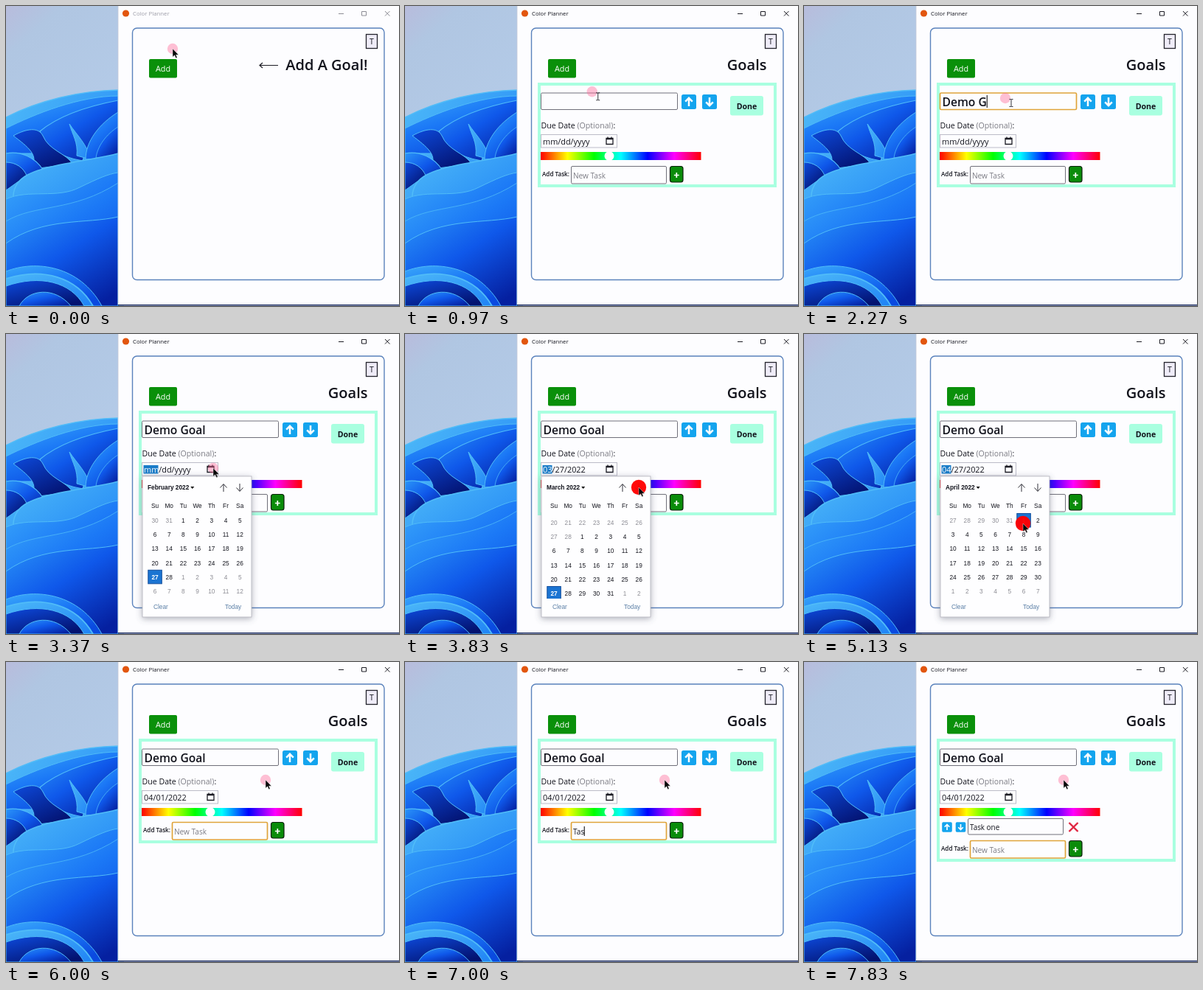
An HTML page for the animation above (8 s loop, 533 by 407 pixels).

```html
<!DOCTYPE html>
<html lang="en">
<head>
<meta charset="utf-8">
<title>Color Planner</title>
<style>
html, body { margin: 0; width: 100%; height: 100%; overflow: hidden; background: #fdfdff; }
svg { display: block; width: 533px; height: 407px; }
text { font-family: "Open Sans", "Noto Sans", sans-serif; fill: #12131c; white-space: pre; }
.medium { font-weight: 500; }
.semi { font-weight: 600; }
.bold { font-weight: 700; }
.mid { text-anchor: middle; }
.hint { fill: #7c7c84; }
.cal text { font-family: "Liberation Sans", Arial, sans-serif; font-size: 8.3px; }
.cal .foot { fill: #5b7fa6; }
.line { fill: none; stroke: #1c1c24; }
.field { fill: #fdfdff; stroke: #70707a; }
.field.focus { stroke: #dfa43a; stroke-width: 1.7; }
</style>
</head>
<body>
<svg viewBox="0 0 533 407">
  <defs>
    <linearGradient id="sky" x2=".35" y2="1">
      <stop stop-color="#b8bcdc"/><stop offset=".15" stop-color="#b0c6e2"/>
      <stop offset=".6" stop-color="#b4cbe8"/><stop offset="1" stop-color="#cfdff2"/>
    </linearGradient>
    <linearGradient id="pale" x2="1" y2="1"><stop stop-color="#4cb8f8"/><stop offset="1" stop-color="#1f82f6"/></linearGradient>
    <linearGradient id="blue" x2=".6" y2="1"><stop stop-color="#3aa8fa"/><stop offset=".5" stop-color="#1b78f6"/><stop offset="1" stop-color="#0a4ae0"/></linearGradient>
    <linearGradient id="deep" x2=".8" y2="1"><stop stop-color="#2a94f8"/><stop offset=".5" stop-color="#0f58ea"/><stop offset="1" stop-color="#0520a0"/></linearGradient>
    <linearGradient id="navy" x2=".7" y2="1"><stop stop-color="#0d4adc"/><stop offset="1" stop-color="#031270"/></linearGradient>
    <linearGradient id="hues">
      <stop stop-color="#f00"/><stop offset=".167" stop-color="#ff0"/><stop offset=".333" stop-color="#0f0"/>
      <stop offset=".5" stop-color="#0ff"/><stop offset=".667" stop-color="#00f"/>
      <stop offset=".833" stop-color="#f0f"/><stop offset="1" stop-color="#f00"/>
    </linearGradient>
    <filter id="shade" x="-20%" y="-20%" width="140%" height="140%"><feDropShadow dx="0" dy="2" stdDeviation="4" flood-color="#505468" flood-opacity=".45"/></filter>
    <clipPath id="grid"><rect x="186" y="241" width="146" height="118"/></clipPath>
    <g id="up">
      <rect x="-10" y="-10" width="20" height="20" rx="2.500" fill="#14a4ee"/>
      <path d="M0 6V-4.500M-4.800-.4L0-5.200L4.800-.4" fill="none" stroke="#fff" stroke-width="2.500"/>
    </g>
  </defs>

  <rect width="160" height="407" fill="url(#sky)"/>
  <g id="petals" stroke="#50bcf8"></g>

  <rect x="152" width="381" height="405" fill="#fdfdff"/>
  <path d="M152 405.800H533" stroke="#14265c" stroke-width="1.600"/>
  <path d="M152 0V405" stroke="#c4c8d8" stroke-width=".8"/>
  <circle cx="162.500" cy="10" r="4.600" fill="#e2560f"/>
  <text id="title" x="172" y="13" font-size="7.800">Color Planner</text>
  <path id="controls" class="line" d="M451 10.500H458M482.500 7.500H488.500V13H482.500ZM514 7L520.500 13.500M520.500 7L514 13.500"/>

  <rect x="171.500" y="30" width="341.500" height="341.500" rx="6" fill="#fdfdff" stroke="#5a82bc" stroke-width="1.400"/>
  <rect x="488.500" y="38.500" width="15" height="19" fill="#efecf8" stroke="#24242c" stroke-width="1.300"/>
  <text class="mid" x="496" y="52" font-size="10.500">T</text>
  <rect x="194" y="72" width="38" height="25.500" rx="2" fill="#0a900a"/>
  <text class="mid" x="213" y="89" font-size="10.800" style="fill:#fff">Add</text>
  <path id="pointer" class="line" d="M369 80.500H344M348 77L344 80.500L348 84" stroke-width="1.200"/>
  <text id="heading" class="semi" x="490.500" y="87" font-size="20" text-anchor="end"></text>

  <g id="form">
    <rect id="frame" x="182" y="106" width="320" height="138" fill="#fdfdff" stroke="#a9ffe0" stroke-width="4"/>
    <rect id="nameBox" class="field" x="184.500" y="118" width="185" height="22.500" rx="1.500"/>
    <text id="name" class="semi" x="187.500" y="135.500" font-size="15.600"></text>
    <use href="#up" x="385" y="130"/>
    <use href="#up" transform="translate(413 130) scale(1 -1)"/>
    <rect x="441" y="122" width="45" height="26.500" rx="3" fill="#a9ffe0"/>
    <text class="bold mid" x="463.500" y="139.500" font-size="10.600">Done</text>
    <text class="medium" x="184.500" y="166" font-size="10.600">Due Date <tspan class="hint">(Optional)</tspan>:</text>
    <rect x="184.500" y="174.500" width="103" height="17.500" fill="#fdfdff" stroke="#bcbcc8"/>
    <rect id="mark" x="186.500" y="178" height="11.500" fill="#1a7cc8"/>
    <text class="medium" x="187" y="187.500" font-size="10.900"><tspan id="month"></tspan><tspan id="rest"></tspan></text>
    <path class="line" d="M273 179.500H282V187.500H273ZM273 180.500H282M275 177.500V179M280 177.500V179" stroke-width="1.300"/>
    <rect x="184" y="198" width="217.500" height="11" fill="url(#hues)"/>
    <circle cx="277" cy="203.500" r="6.500" fill="#fdfdff"/>

    <g id="task">
      <use href="#up" transform="translate(194 224) scale(.68)"/>
      <use href="#up" transform="translate(212.500 224) scale(.68 -.68)"/>
      <rect class="field" x="222.500" y="212.500" width="129" height="21.500" rx="1.500"/>
      <text x="225" y="227.500" font-size="9.900">Task one</text>
      <path d="M359.500 218L371.500 230M371.500 218L359.500 230" stroke="#e02440" stroke-width="2.400"/>
    </g>
    <g id="entry">
      <text class="semi" x="186" y="231" font-size="8.100">Add Task:</text>
      <rect id="taskBox" class="field" x="225.500" y="217.500" width="129" height="23.500" rx="1.500"/>
      <text id="typed" x="228" y="233.500" font-size="10.100"></text>
      <rect x="359.500" y="217.500" width="17.500" height="21.500" rx="3" fill="#0a8c0a" stroke="#0b200b" stroke-width="1.200"/>
      <path d="M364.900 229.500H371.700M368.300 226.100V232.900" stroke="#fff" stroke-width="1.700"/>
    </g>
    <path id="caret" stroke="#111" stroke-width="1.100"/>
  </g>

  <g id="cal" class="cal">
    <rect x="185" y="193" width="148" height="191" fill="#fefeff" stroke="#b0b0ba" stroke-width=".8" filter="url(#shade)"/>
    <text id="view" class="bold" x="192" y="211"></text>
    <path id="drop" d="M0 0H5L2.500 3Z"/>
    <path class="line" d="M295 214V204M290.500 208.500L295 203.500L299.500 208.500M317 203V213M312.500 208.500L317 213.500L321.500 208.500" stroke-width=".9"/>
    <g id="week"></g>
    <g clip-path="url(#grid)">
      <rect id="hover" width="19" height="19" fill="#b2d2f8"/>
      <rect id="chosen" width="18.500" height="18.500" fill="#1b74d2" stroke="#164f9c"/>
      <g id="days"></g>
    </g>
    <text class="foot" x="200" y="373">Clear</text>
    <text class="foot" x="297" y="373">Today</text>
  </g>

  <g id="cursor">
    <circle id="halo"/>
    <path id="arrow" d="M0 0V11.200L2.600 8.800L4.400 12.700L6.200 11.900L4.500 8.200H8Z" fill="#080808" stroke="#fff" stroke-width=".4"/>
    <path id="beam" class="line" d="M5.500 1.500H7.500L8 2L8.500 1.500H10.500M8 2V11M5.500 11.500H7.500L8 11L8.500 11.500H10.500" stroke-width=".9"/>
  </g>
</svg>

<script>
const $ = id => document.getElementById(id);
const LOOP = 8000, CELL = 19.2;

// Wallpaper: soft blue ribbons, back to front.
const PETALS = [
  ["M0 151C45 128 100 115 152 114V407H0Z", "pale", 1.5],
  ["M0 166C40 146 100 122 152 122V200H0Z", "blue", 1],
  ["M46 170C70 150 110 136 152 128V152C124 164 110 188 104 210C72 205 52 190 46 170Z", "deep", 1.2],
  ["M10 176C28 166 44 164 50 176C58 196 82 200 90 214L30 222C50 205 28 190 10 176Z", "navy", 1],
  ["M86 160C96 175 112 190 114 208L96 203C98 185 90 175 86 160Z", "pale", 1],
  ["M108 208C108 184 126 160 152 144V206Z", "blue", 1],
  ["M122 206C124 190 136 174 152 164V206Z", "deep", .8],
  ["M0 200C20 196 40 206 50 222L0 246Z", "deep", 1.2],
  ["M0 212C14 212 24 220 28 230L0 250Z", "navy", 1],
  ["M10 262C8 230 40 222 80 214C110 208 130 206 152 200V290H10Z", "pale", 1.5],
  ["M0 262C30 248 70 262 100 246C125 234 138 228 152 226V407H0Z", "blue", 1],
  ["M0 292C40 268 90 280 152 240V407H0Z", "blue", .8],
  ["M0 322C50 286 110 296 152 286V407H0Z", "deep", 1],
  ["M0 360C40 344 100 352 130 407H0Z", "blue", 1],
  ["M0 370C50 354 96 368 118 407H0Z", "pale", 1.8],
  ["M0 380C46 364 88 374 106 407H0Z", "navy", 1],
  ["M18 407C30 384 66 380 88 407Z", "deep", 1]
];
$("petals").innerHTML = PETALS.map(([d, fill, w]) =>
  `<path d="${d}" fill="url(#${fill})" stroke-width="${w}"/>`).join("");

const column = c => 202 + CELL * c;
$("week").innerHTML = ["Su", "Mo", "Tu", "We", "Th", "Fr", "Sa"].map((d, c) =>
  `<text class="mid" x="${column(c)}" y="236">${d}</text>`).join("");
$("days").innerHTML = '<text class="mid"></text>'.repeat(49);
const cells = [...$("days").children];

// Cursor path: time, x, y
const PATH = [
  [30, 226, 58], [230, 212, 80], [400, 212, 82], [480, 212, 83], [700, 238, 108],
  [900, 240, 110], [1060, 273, 125], [2770, 273, 125], [3090, 281, 182], [3400, 281, 182],
  [3680, 317, 208], [4040, 317, 208], [4120, 298, 286], [4170, 288, 299], [4400, 290, 306],
  [4800, 296, 270], [5050, 297, 257], [5270, 297, 257], [5600, 285, 225], [5720, 285, 225],
  [5970, 352, 160]
];
const ADD = 460, NAME = 1080, DATE = 3110, OPEN = 3200, NEXT = [3720, 4030],
      PICK = 5060, CLOSE = 5200, TASK = 5650, BLINK = 6200, ENTER = 7770;
const CLICKS = [ADD, NAME, DATE, ...NEXT, PICK, TASK];
const NAME_KEYS = [1500, 1670, 1830, 1970, 2130, 2270, 2370, 2430, 2530];
const TASK_KEYS = [6430, 6670, 6870, 7070, 7230, 7430, 7530, 7630];

const clamp = v => Math.max(0, Math.min(1, v));
const show = (id, on) => { $(id).style.display = on ? "" : "none"; };
const attr = (el, set) => { for (const k in set) el.setAttribute(k, set[k]); };
const count = (list, t) => list.filter(v => v <= t).length;
const last = (list, t) => list.filter(v => v <= t).pop();

function place(t) {
  const i = count(PATH.map(p => p[0]), t);
  if (!i) return PATH[0].slice(1);
  if (i === PATH.length) return PATH[i - 1].slice(1);
  const [a, b] = [PATH[i - 1], PATH[i]];
  const p = clamp((t - a[0]) / (b[0] - a[0])), e = p * p * (3 - 2 * p);
  return [a[1] + (b[1] - a[1]) * e, a[2] + (b[2] - a[2]) * e];
}

function drawCalendar(t) {
  const open = t >= OPEN && t < CLOSE;
  show("cal", open);
  if (!open) return;
  const month = 1 + count(NEXT, t);
  const scroll = NEXT.reduce((s, at) => s + 4 * (1 - (1 - clamp((t - at) / 240)) ** 2), 0);
  const rowY = r => 253 + CELL * (r - scroll);
  const chosenDay = t >= PICK ? 1 : 27;

  $("view").textContent = ["", "February", "March", "April"][month] + " 2022";
  attr($("drop"), { transform: `translate(${194 + $("view").getComputedTextLength()} 207)` });

  const first = Math.floor(scroll);
  show("chosen", false);
  cells.forEach((cell, i) => {
    const c = i % 7, r = first + Math.floor(i / 7);
    const date = new Date(2022, 0, 30 + 7 * r + c), inside = date.getMonth() === month;
    const chosen = inside && date.getDate() === chosenDay;
    cell.textContent = date.getDate();
    attr(cell, { x: column(c), y: rowY(r) + 3 });
    cell.style.fill = chosen ? "#fff" : inside ? "#12131c" : "#8c8c94";
    cell.style.fontWeight = chosen ? 700 : 400;
    if (chosen) {
      show("chosen", true);
      attr($("chosen"), { x: column(c) - 9.2, y: rowY(r) - 9.5 });
    }
  });

  const [x, y] = place(t - 50);
  const c = Math.round((x - 202) / CELL), r = Math.round((y - 253) / CELL + scroll);
  show("hover", y > 244 && y < 358);
  attr($("hover"), { x: column(c) - 9.5, y: rowY(r) - 9.5 });
}

function drawForm(t) {
  const added = t >= ADD, done = t >= ENTER, shift = done ? 25 : 0;
  $("title").style.fill = added ? "" : "#9c9ca6";
  $("controls").style.stroke = added ? "" : "#8c8c94";
  $("heading").textContent = added ? "Goals" : "Add A Goal!";
  show("pointer", !added);
  show("form", added);
  show("task", done);
  attr($("frame"), { height: 138 + shift });
  attr($("entry"), { transform: `translate(0 ${shift})` });

  const onName = t >= NAME && t < DATE, onDate = t >= DATE && t < TASK, onTask = t >= TASK;
  $("nameBox").classList.toggle("focus", onName);
  $("taskBox").classList.toggle("focus", onTask);

  const name = "Demo Goal".slice(0, count(NAME_KEYS, t));
  const task = done ? "" : "Task one".slice(0, count(TASK_KEYS, t));
  $("name").textContent = name;
  $("typed").textContent = task || "New Task";
  $("typed").setAttribute("class", task ? "" : "hint");

  const turned = count(NEXT, t);
  $("month").textContent = turned ? `0${2 + turned}` : "mm";
  $("rest").textContent = t >= CLOSE ? "/01/2022" : turned ? "/27/2022" : "/dd/yyyy";
  $("month").style.fill = onDate ? "#fff" : "";
  show("mark", onDate);
  attr($("mark"), { width: turned ? 13 : 20 });

  const typing = t >= BLINK && !done;
  const since = last([NAME, ...NAME_KEYS, BLINK, ...TASK_KEYS], t);
  show("caret", (onName || typing) && (t - since) % 1060 < 530);
  const width = (id, text) => text ? $(id).getComputedTextLength() : 0;
  attr($("caret"), { d: onName
    ? `M${188 + width("name", name)} 121V138`
    : `M${228 + width("typed", task)} 223V236` });
}

function drawCursor(t) {
  const [x, y] = place(t), age = t - (last(CLICKS, t) ?? -LOOP);
  const heat = 1 - clamp((age - 170) / 80);
  const mix = (a, b) => a + (b - a) * heat;
  attr($("cursor"), { transform: `translate(${x} ${y})` });
  attr($("halo"), {
    r: mix(7.2, 10.2),
    fill: `rgba(255,${mix(110, 0)},${mix(155, 0)},${mix(.43, .96)})`
  });
  const overName = t >= ADD && x > 177 && x < 362 && y > 112 && y < 135;
  const overTask = t >= CLOSE && x > 226 && x < 354 && y > 217 && y < 241;
  show("beam", overName || overTask);
  show("arrow", !overName && !overTask);
}

function draw() {
  const t = performance.now() % LOOP;
  drawForm(t);
  drawCalendar(t);
  drawCursor(t);
  requestAnimationFrame(draw);
}
draw();
</script>
</body>
</html>
```
